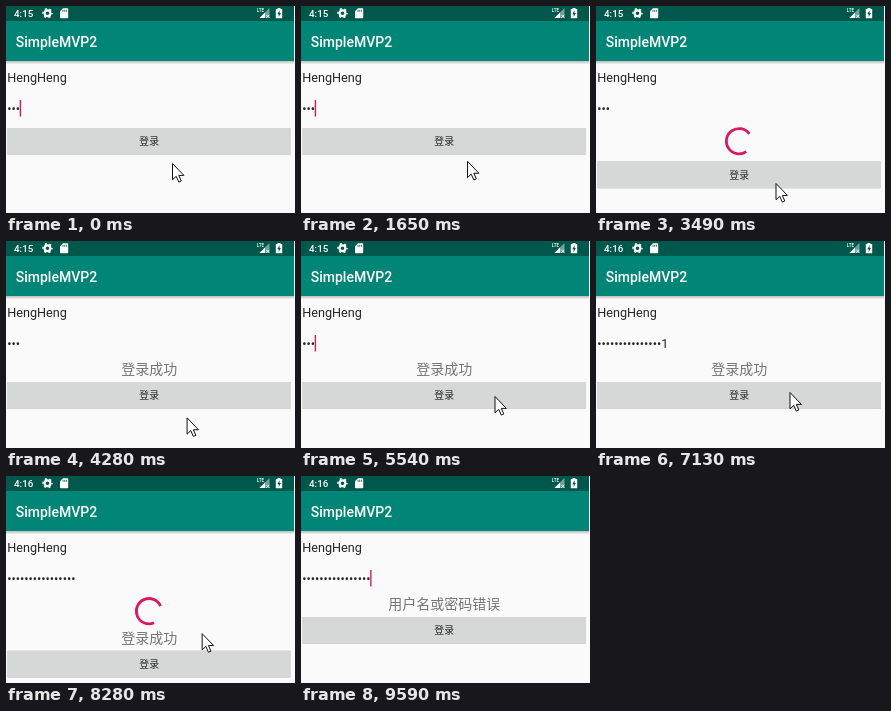
These frames come from a looping animation (289x207 px, 9710 ms). An HTML page:

```html
<!DOCTYPE html>
<html lang="zh-CN">
<head>
<meta charset="utf-8">
<title>SimpleMVP2</title>
<style>
  html, body { margin: 0; width: 100%; height: 100%; overflow: hidden; background: #fafafa; }
  svg { display: block; width: 289px; height: 207px; }
  text { font-family: Roboto, "Noto Sans CJK SC", "Noto Sans CJK", sans-serif; }
  .bar { fill: #fff; font-weight: 500; }
  .field { font-size: 12.65px; fill: #262626; }
  .mid { text-anchor: middle; }
  #button rect { filter: drop-shadow(0 .8px .7px rgba(0, 0, 0, .3)); }
</style>
</head>
<body>
<svg viewBox="0 0 289 207">
  <defs>
    <linearGradient id="shade" x2="0" y2="1">
      <stop stop-color="#000" stop-opacity=".25"/>
      <stop offset="1" stop-color="#000" stop-opacity="0"/>
    </linearGradient>
  </defs>
  <rect width="289" height="207" fill="#fafafa"/>
  <rect y="55" width="288" height="3.5" fill="url(#shade)"/>
  <rect y="15" width="288" height="40" fill="#008577"/>
  <rect width="288" height="15" fill="#00574b"/>

  <!-- status bar -->
  <text id="clock" class="bar" x="8" y="11" font-size="9.8"></text>
  <g fill="none" stroke="#fff">
    <circle cx="41.5" cy="7.2" r="2.9" stroke-width="2.2"/>
    <circle cx="41.5" cy="7.2" r="4.5" stroke-width="1.4" stroke-dasharray="2.1 2.612" stroke-dashoffset="1"/>
  </g>
  <path d="M57 2.2h4.4q.8 0 .8.8v8.4q0 .8-.8.8h-6.6q-.8 0-.8-.8V5.2z" fill="#fff"/>
  <path d="M57 3.8v2M58.7 3.8v2M60.4 3.8v2" stroke="#00574b" stroke-width=".8"/>
  <path d="M263.5 2v10h-10z" fill="#fff" opacity=".45"/>
  <path d="M259 6.5V12h-5.5z" fill="#fff"/>
  <path d="M260.3 8.8l3 3m0-3l-3 3" stroke="#fff" stroke-width=".9"/>
  <text class="bar" x="250.8" y="5.8" font-size="4.6">LTE</text>
  <path d="M271.5 2h3v1h1.7v9.3h-6.4V3h1.7z" fill="#fff"/>
  <path d="M273.6 4.3l-2.3 3.9h1.4v2.8l2.2-4h-1.3z" fill="#00574b"/>

  <text class="bar" x="9.7" y="40.6" font-size="14">SimpleMVP2</text>
  <text class="field" x="1.2" y="75.5">HengHeng</text>
  <text id="password" class="field" x="1.2" y="106.5"></text>
  <rect id="caret" y="94" width="1.4" height="16.5" fill="#d81b60"/>

  <circle id="spinner" cx="143" cy="135.2" r="12.65" fill="none" stroke="#d81b60" stroke-width="2.8" pathLength="360"/>
  <text id="result" class="mid" x="143.2" y="133.2" font-size="14" fill="#757575"></text>
  <g id="button">
    <rect x="1" y="122" width="284" height="26.7" rx="1.4" fill="#d6d7d7"/>
    <text class="mid" x="143.2" y="139.2" font-size="9.9" fill="#262626">登录</text>
  </g>
  <path id="pointer" d="M.5 .5v16.3l3.7-3.5 2.6 5.8 2.5-1.1-2.5-5.6h5.1z" fill="#fff" stroke="#111" stroke-width="1"/>
</svg>
<script>
const LOOP = 9710;
const LOADS = [[2860, 3850], [7600, 8610]];
const BLINKS = [150, 620, 1150, 1650, 2150, 2650, 3120, 3600, 4060, 4540,
  5020, 5540, 7130, 7600, 8110, 8610, 9060, 9590];
// time, x, y
const PATH = [[0, 166, 157], [1620, 166, 157], [1850, 166, 141], [2040, 166, 141],
  [2310, 166, 134], [2950, 166, 134], [3450, 179.5, 177], [4250, 179.5, 177],
  [4580, 191, 170], [4700, 191, 170], [4870, 193.5, 155], [6400, 193.5, 155],
  [6700, 193.5, 151], [8050, 193.5, 151], [8270, 195.5, 156], [8800, 203, 212], [LOOP, 203, 212]];

const $ = id => document.getElementById(id);
const show = (el, on) => el.setAttribute('visibility', on ? 'visible' : 'hidden');
const move = (el, x, y) => el.setAttribute('transform', `translate(${x} ${y})`);

// cubic-bezier(.4, 0, .2, 1)
function ease(x) {
  if (x <= 0) return 0;
  if (x >= 1) return 1;
  let lo = 0, hi = 1, s;
  for (let i = 0; i < 20; i++) {
    s = (lo + hi) / 2;
    if (1.2 * s * (1 - s) ** 2 + .6 * s * s * (1 - s) + s ** 3 < x) lo = s; else hi = s;
  }
  return s * s * (3 - 2 * s);
}

function pointerAt(t) {
  const i = PATH.findIndex(p => p[0] > t);
  const [t0, x0, y0] = PATH[i - 1], [t1, x1, y1] = PATH[i];
  const k = (t - t0) / (t1 - t0);
  return [x0 + (x1 - x0) * k, y0 + (y1 - y0) * k];
}

function passwordAt(t) {
  let n = 3;
  if (t >= 5910) n = 4;
  if (t >= 6310) n += Math.min(12, 1 + Math.floor((t - 6310) / 44.5));
  const plain = t >= 5910 && t < 8270;
  return plain ? '•'.repeat(n - 1) + '1' : '•'.repeat(n);
}

function drawSpinner(age) {
  const p = age / 1333;
  const start = 270 * ease(p * 2 - 1), end = 270 * ease(p * 2);
  const turn = -90 + 90 * p + age * 720 / 4444;
  $('spinner').setAttribute('stroke-dasharray', `${Math.max(end - start, 1)} 360`);
  $('spinner').setAttribute('transform', `rotate(${turn + start} 143 135.2)`);
}

function draw(t) {
  $('clock').textContent = t < 6980 ? '4:15' : '4:16';

  const password = $('password');
  password.textContent = passwordAt(t);
  $('caret').setAttribute('x', .9 + password.getComputedTextLength());
  show($('caret'), BLINKS.filter(b => b <= t).length % 2 === 0);

  const load = LOADS.find(([from, to]) => t >= from && t < to);
  show($('spinner'), load);
  if (load) drawSpinner(t - load[0]);

  const result = t < 3850 ? '' : t < 8610 ? '登录成功' : '用户名或密码错误';
  const drop = load ? 33.6 : 0;
  $('result').textContent = result;
  move($('result'), 0, drop);
  move($('button'), 0, drop + (result ? 19.1 : 0));
  move($('pointer'), ...pointerAt(t));
}

const begin = performance.now();
function tick() {
  draw((performance.now() - begin) % LOOP);
  requestAnimationFrame(tick);
}
tick();
</script>
</body>
</html>
```
